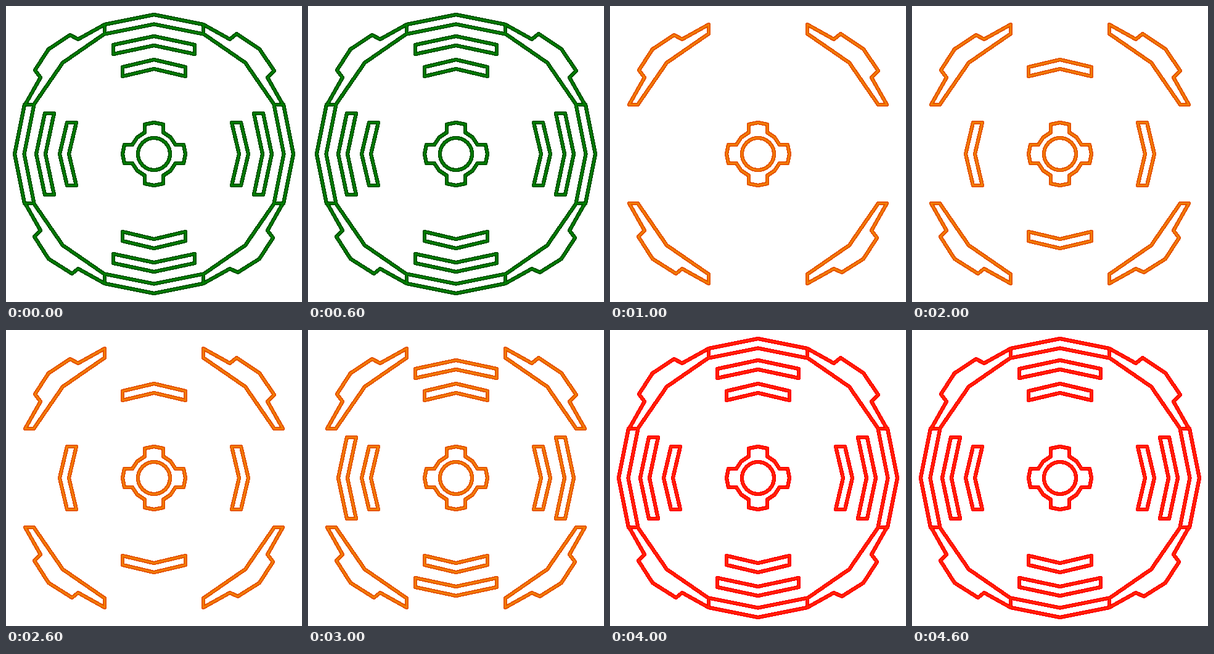
These frames come from a looping animation (480x480 px, 5 s). An HTML page:

```html
<!DOCTYPE html>
<html lang="en">
<head>
<meta charset="utf-8">
<title>Segmented rotor</title>
<style>
  html, body { margin: 0; width: 100%; height: 100%; overflow: hidden; background: #fff; }
  svg { display: block; width: 100vw; height: 100vh; }
  path { fill: none; stroke-linejoin: round; shape-rendering: crispEdges; }
  .edge, .core, .ring, .mid, .near { animation: 5s step-end infinite; }
  .edge { stroke-width: 6.4; animation-name: edge; }
  .core { stroke-width: 2.2; animation-name: core; }
  .ring { animation-name: ring; }
  .mid { animation-name: mid; }
  .near { animation-name: near; }

  @keyframes edge {
    0% { stroke: #005400; }
    20% { stroke: #e65400; }
    80%, 100% { stroke: #ff0000; }
  }
  @keyframes core {
    0% { stroke: #008400; }
    20% { stroke: #f48200; }
    80%, 100% { stroke: #ff2a00; }
  }
  @keyframes ring {
    0% { visibility: visible; }
    20% { visibility: hidden; }
    80%, 100% { visibility: visible; }
  }
  @keyframes mid {
    0% { visibility: visible; }
    20% { visibility: hidden; }
    60%, 100% { visibility: visible; }
  }
  @keyframes near {
    0% { visibility: visible; }
    20% { visibility: hidden; }
    40%, 100% { visibility: visible; }
  }
</style>
</head>
<body>
<svg viewBox="0 0 480 480">
  <g id="art" transform="translate(240 240)"></g>
</svg>
<script>
  const art = document.getElementById('art');
  const turns = [0, 1, 2, 3];

  const closed = points => 'M' + points.map(p => p.join(' ')).join('L') + 'Z';

  // Rotate a point by quarter turns around the centre.
  const turn = ([x, y], n) => n ? turn([-y, x], n - 1) : [x, y];

  // Four bent bars, given by half width, apex radius, drop at the ends and thickness.
  function bars(half, apex, drop, thick) {
    const low = drop - apex;
    const bar = [
      [-half, low], [0, -apex], [half, low],
      [half, low + thick], [0, thick - apex], [-half, low + thick]
    ];
    return turns.map(n => closed(bar.map(p => turn(p, n)))).join('');
  }

  // One corner plate; a and b are the tips of its two notches.
  function corner(sx, sy, a, b) {
    const at = (x, y) => [sx * x, sy * y];
    return closed([
      at(80, 210), at(80, 195), at(148, 148), at(195, 80), at(209, 80),
      at(184, 124), b, at(171, 170), a, at(123, 186)
    ]);
  }

  const corners =
    corner(-1, -1, [-136, -193], [-193, -136]) +
    corner(1, -1, [134, -195], [195, -135]) +
    corner(-1, 1, [-133, 194], [-194, 134]) +
    corner(1, 1, [136, 192], [193, 136]);

  const tab = [[-15, -48], [0, -51], [15, -48], [15, -35], [27, -27]];
  const gear = closed(turns.flatMap(n => [...tab, [35, -15]].map(p => turn(p, n))));
  const hole = 'M26 0A26 26 0 1 1 -26 0A26 26 0 1 1 26 0Z';

  const parts = {
    fixed: corners + gear + hole,
    ring: bars(80, 226, 16, 15.5),
    mid: bars(66, 191, 14, 15),
    near: bars(51, 153, 12, 15)
  };

  for (const layer of ['edge', 'core']) {
    const group = document.createElementNS(art.namespaceURI, 'g');
    group.setAttribute('class', layer);
    for (const name in parts) {
      const path = document.createElementNS(art.namespaceURI, 'path');
      path.setAttribute('class', name);
      path.setAttribute('d', parts[name]);
      group.append(path);
    }
    art.append(group);
  }
</script>
</body>
</html>
```
